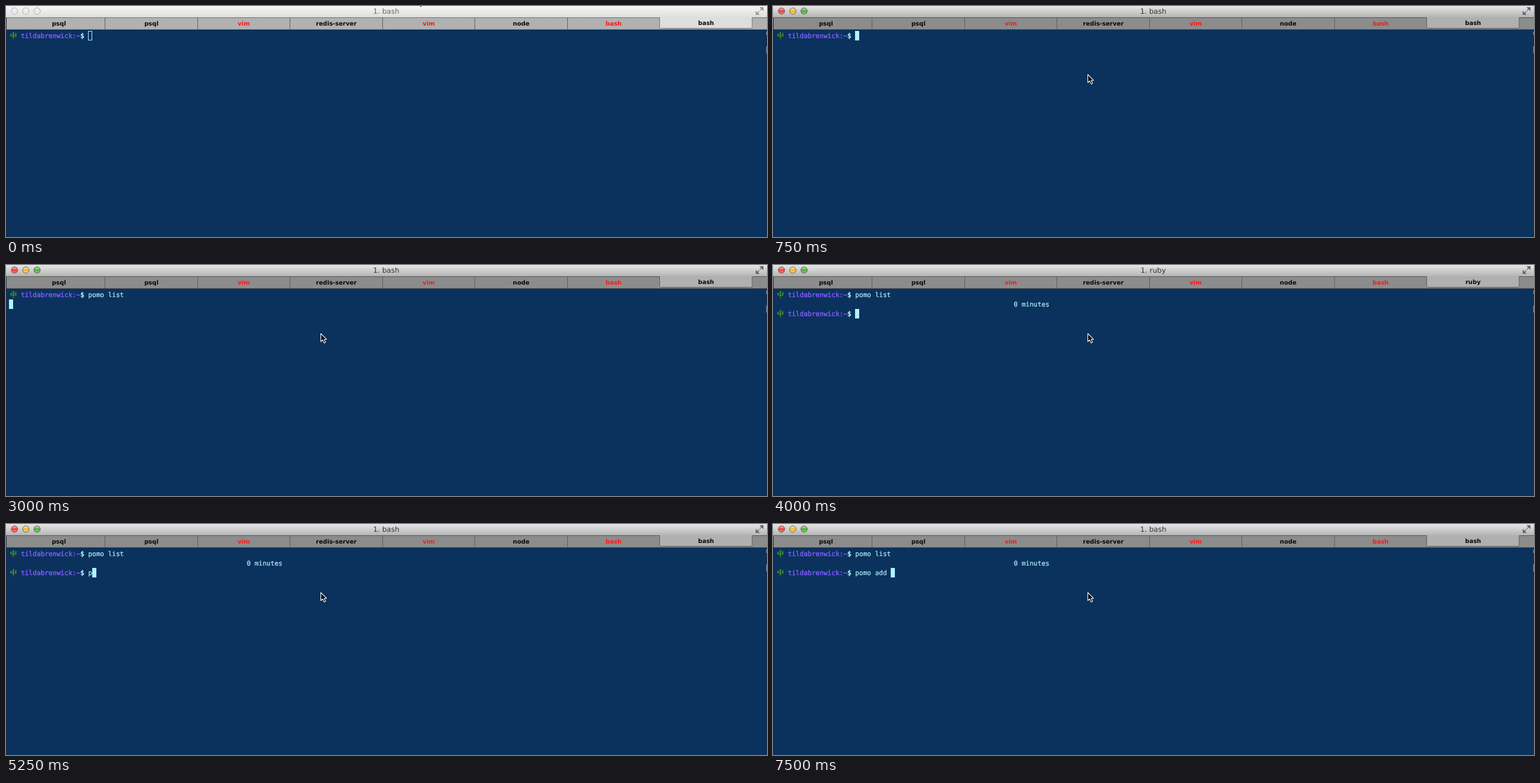
Animation, 1280 px wide and 389 px high, one loop 8000 ms. Source, as an HTML page:

```html
<!DOCTYPE html>
<html lang="en">
<head>
<meta charset="utf-8">
<title>Terminal</title>
<style>
  html, body { margin: 0; width: 100%; height: 100%; overflow: hidden; background: #0b315d; }
  svg { display: block; width: 1280px; height: 389px; }
  text { text-rendering: geometricPrecision; white-space: pre; }
  .ui { font-family: "DejaVu Sans", sans-serif; text-anchor: middle; }
  .title { font-size: 12px; }
  .tab { font-size: 10px; font-weight: bold; }
  .term { font: 11.07px "DejaVu Sans Mono", monospace; fill: #b4f5ff; stroke: #b4f5ff; stroke-width: .2px; }
  .term .user { fill: #7f5cff; stroke: #7f5cff; stroke-width: .45px; }
  .term .dollar { stroke-width: .5px; }
</style>
</head>
<body>
<svg id="stage" viewBox="0 0 1280 389">
  <defs>
    <linearGradient id="barActive" x2="0" y2="1">
      <stop offset="0" stop-color="#e6e6e6"/><stop offset="1" stop-color="#b3b3b3"/>
    </linearGradient>
    <linearGradient id="barIdle" x2="0" y2="1">
      <stop offset="0" stop-color="#f6f6f6"/><stop offset="1" stop-color="#dedede"/>
    </linearGradient>
    <linearGradient id="shine" x2="0" y2="1">
      <stop offset="0" stop-color="#fff" stop-opacity=".65"/>
      <stop offset=".5" stop-color="#fff" stop-opacity="0"/>
      <stop offset="1" stop-color="#fff" stop-opacity=".35"/>
    </linearGradient>
    <g id="cactus" fill="none" stroke-linecap="round" stroke-linejoin="round">
      <path d="M12.5 44.5V53M8.5 47.5V50.5H12M16.5 46.5V51H13" stroke="#246b2b" stroke-width="2.6"/>
      <path d="M12.2 44.5V52M8.3 47.5V50M16.3 46.5V50" stroke="#55a641" stroke-width="1"/>
      <path d="M11 55.2H14" stroke="#4b4a2c" stroke-width="1.6"/>
    </g>
  </defs>
  <rect width="1280" height="389" fill="#0b315d"/>
  <g id="terminal" class="term"></g>
  <rect id="caret" height="16"/>
  <g id="chrome"></g>
  <path id="pointer" d="M.5 .5V14L3.7 11.1L6 16.4L8.5 15.3L6.2 10.2H10.2Z" fill="#080808" stroke="#fff" stroke-width="1.1" stroke-linejoin="round"/>
</svg>
<script>
const LOOP = 8000;
const CELL = 6.667, LEFT = 5, TOP = 42, ROW = 16;
const PROMPT_COLS = 20;
const FOCUS_AT = 750, ENTER_AT = 3000, OUTPUT_AT = 4000, IDLE_AT = 4500;

// Steps are [start time, value]; the last one reached is in force.
const pointerSteps = [[0, [691, -14]], [250, [573, 90]], [500, [529, 115]]];
const firstCommand = [[0, ''], [1250, 'p'], [1500, 'pom'], [1750, 'pomo'],
  [2500, 'pomo l'], [2750, 'pomo lis'], [ENTER_AT, 'pomo list']];
const secondCommand = [[0, ''], [4250, 'p'], [4500, 'pmo'], [5250, 'p'], [5500, 'pom'],
  [5750, 'pomo '], [6000, 'pomo a'], [6250, 'pomo ad'], [6500, 'pomo add ']];

const $ = id => document.getElementById(id);
const stepAt = (steps, t) => steps.filter(([start]) => start <= t).pop()[1];
const colX = col => LEFT + col * CELL;

function add(parent, tag, attrs, text = '') {
  const el = document.createElementNS('http://www.w3.org/2000/svg', tag);
  for (const key in attrs) el.setAttribute(key, attrs[key]);
  el.textContent = text;
  parent.appendChild(el);
  return el;
}

function set(el, attrs) {
  for (const key in attrs) el.setAttribute(key, attrs[key]);
}

function termText(parent, col, row, text, cls = '') {
  return add(parent, 'text', { x: colX(col), y: TOP + row * ROW + 12, class: cls }, text);
}

function promptLine(row) {
  const group = add($('terminal'), 'g', {});
  add(group, 'use', { href: '#cactus', y: row * ROW });
  termText(group, 3, row, 'tildabrenwick:~', 'user');
  termText(group, 18, row, '$', 'dollar');
  return { group, input: termText(group, PROMPT_COLS, row, '') };
}

const first = promptLine(0);
const output = termText($('terminal'), 60, 1, '0 minutes');
const second = promptLine(2);

const chrome = $('chrome');
const titleBar = add(chrome, 'rect', { width: 1280, height: 19.5 });
const tabBar = add(chrome, 'rect', { y: 19, width: 1280, height: 21 });
const edges = add(chrome, 'path', { d: 'M0 19.5H1099.5M1255.5 19.5H1280M0 39.5H1280', fill: 'none' });
const openTab = add(chrome, 'path', { d: 'M1099.5 19V35.5Q1099.5 37.5 1101.5 37.5H1253Q1255 37.5 1255 35.5V19' });

const labels = ['psql', 'psql', 'vim', 'redis-server', 'vim', 'node', 'bash', 'bash'].map((name, i) => {
  const x = 89 + 155.5 * i;
  if (i < 6) add(chrome, 'path', { d: `M${Math.floor(x + 77.5) + .5} 20V39`, stroke: '#5e5e5e' });
  const alert = [2, 4, 6].includes(i);
  return add(chrome, 'text', { x, y: i === 7 ? 32 : 33, class: 'ui tab', fill: alert ? '#ff1717' : '#080808' }, name);
});
const title = add(chrome, 'text', { x: 639.5, y: 13, class: 'ui title' });

const lights = ['#ed3f3d', '#f4b52f', '#4caf3c'].map((color, i) => {
  const place = { cx: 14.3 + 19 * i, cy: 8.5 };
  const dot = add(chrome, 'circle', { ...place, r: 5.4 });
  add(chrome, 'circle', { ...place, r: 4.5, fill: 'url(#shine)' });
  return { dot, color };
});

const expand = add(chrome, 'path', {
  d: 'M1268.5 2.5H1273.5V7.5ZM1271.5 4.5L1268 8M1261.5 9.5V14.5H1266.5ZM1263.5 12.5L1267 9',
  'stroke-width': 1.1
});

add(chrome, 'path', { d: 'M.5 20V389M1279 40V389', stroke: '#1c2a3d', fill: 'none' });
add(chrome, 'path', { d: 'M1279.3 43V49M1279.3 68V80', stroke: '#9ca5b0', fill: 'none' });

function render(t) {
  const focused = t >= FOCUS_AT;
  const done = t >= OUTPUT_AT;
  const program = done && t < IDLE_AT ? 'ruby' : 'bash';

  set(titleBar, { fill: focused ? 'url(#barActive)' : 'url(#barIdle)' });
  set(tabBar, { fill: focused ? '#8c8c8c' : '#b1b1b1' });
  set(edges, { stroke: focused ? '#555' : '#747474' });
  set(openTab, { fill: focused ? '#b0b0b0' : '#dedede', stroke: focused ? '#606060' : '#777' });
  set(title, { fill: focused ? '#333' : '#686868' });
  set(expand, { fill: focused ? '#666' : '#999', stroke: focused ? '#666' : '#999' });
  for (const { dot, color } of lights) {
    set(dot, { fill: focused ? color : '#e9e9e9', stroke: focused ? '#65615b' : '#a5a5a5', 'stroke-width': .9 });
  }
  title.textContent = '1. ' + program;
  labels[7].textContent = program;

  first.input.textContent = stepAt(firstCommand, t);
  second.input.textContent = stepAt(secondCommand, t);
  set(output, { visibility: done ? 'visible' : 'hidden' });
  set(second.group, { visibility: done ? 'visible' : 'hidden' });

  const row = done ? 2 : t >= ENTER_AT ? 1 : 0;
  const line = done ? second : first;
  const col = row === 1 ? 0 : PROMPT_COLS + line.input.textContent.length;
  const inset = focused ? 0 : .5;
  set($('caret'), {
    x: Math.round(colX(col)) + inset,
    y: TOP + row * ROW + inset,
    width: focused ? 7 : 6,
    height: 16 - 2 * inset,
    fill: focused ? '#aef3ff' : 'none',
    stroke: focused ? 'none' : '#aef3ff'
  });

  $('pointer').setAttribute('transform', `translate(${stepAt(pointerSteps, t)})`);
}

const startTime = performance.now();
function tick() {
  render((performance.now() - startTime) % LOOP);
  requestAnimationFrame(tick);
}
tick();
</script>
</body>
</html>
```
